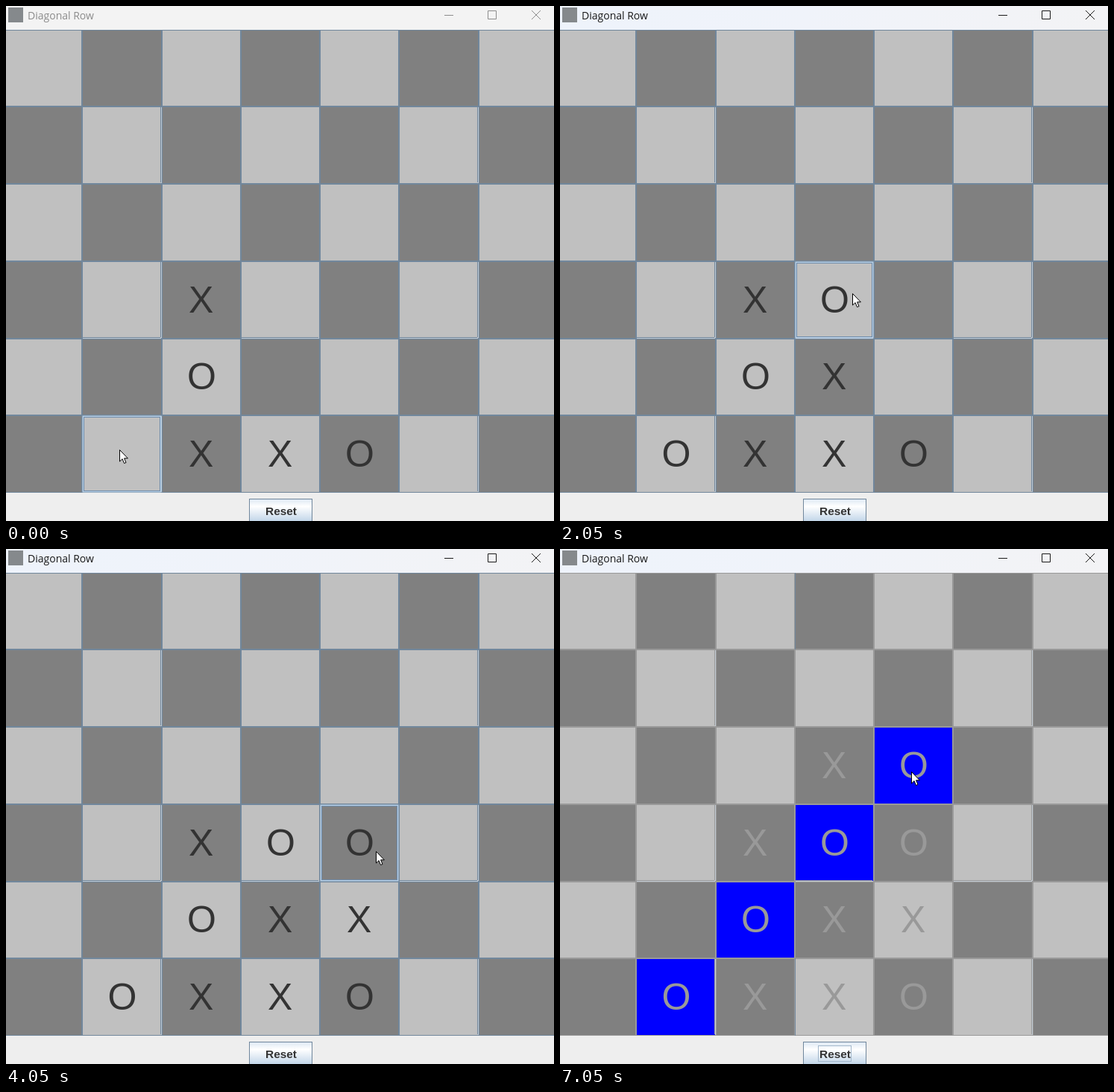
An HTML page for the animation above (8000 ms loop, 735 by 692 pixels).

```html
<!DOCTYPE html>
<html lang="en">
<head>
<meta charset="utf-8">
<title>Diagonal Row</title>
<style>
  html, body { margin: 0; width: 100%; height: 100%; overflow: hidden; background: #eee; }
  svg { display: block; width: 735px; height: 692px; --line: #71879c; --mark: #333; --ink: #1a1a1a; }
  svg.over { --line: #999; --mark: #999; }
  svg.idle { --ink: #8c8c8c; }
  .idle #active, svg:not(.over) .won { visibility: hidden; }
  .title { font: 14px "Open Sans", "Noto Sans", sans-serif; fill: var(--ink); }
  .controls { fill: none; stroke: var(--ink); }
  .grid { fill: none; stroke: var(--line); }
  .mark { font: 50px "Liberation Sans", Arial, sans-serif; fill: var(--mark); text-anchor: middle; }
  .reset { font: bold 15.4px "Liberation Sans", Arial, sans-serif; fill: #333; text-anchor: middle; }
</style>
</head>
<body>
<svg id="stage" class="idle" viewBox="0 0 735 692">
  <defs>
    <linearGradient id="bar">
      <stop stop-color="#eef3fb"/>
      <stop offset=".45" stop-color="#f0f3fa"/>
      <stop offset="1" stop-color="#f3f3f5"/>
    </linearGradient>
    <linearGradient id="gloss" x2="0" y2="1">
      <stop stop-color="#dde8f3"/>
      <stop offset=".3" stop-color="#fff"/>
      <stop offset="1" stop-color="#b8cfe5"/>
    </linearGradient>
  </defs>

  <rect width="735" height="32" fill="#f3f3f3"/>
  <rect id="active" width="735" height="32" fill="url(#bar)"/>
  <rect x="3" y="2" width="20" height="20" fill="#85898c"/>
  <text class="title" x="29" y="18">Diagonal Row</text>
  <path class="controls" d="M588 12.5h12M646.5 6.5h11v11h-11zM705 6l12 12m0-12l-12 12"/>

  <g id="board"></g>
  <g id="focus" fill="none">
    <rect id="glow" stroke="#b8cfe5" stroke-width="2"/>
    <rect id="inner" stroke="#6f8dad"/>
  </g>
  <g id="marks"></g>

  <rect x="326.5" y="662.5" width="84" height="33" fill="url(#gloss)" stroke="#71879c"/>
  <text class="reset" x="369" y="684">Reset</text>
  <rect class="won" x="346.5" y="667.5" width="44" height="21" fill="none" stroke="#a3b8cc"/>

  <path id="cursor" d="M.5 .5v15.5l3.6-3.4 2.4 5.9 2.5-1-2.4-5.7h4.8z" fill="#fff" stroke="#000"/>
</svg>
<script>
const LOOP = 8000;
const X = [-4, 102, 209, 315, 421, 527, 634, 740];
const Y = [32, 135, 239, 343, 447, 550, 654];

// focus: [row, column]; cursor: tip of the pointer
const steps = [
  { at: 0, focus: [5, 1], cursor: [152, 596] },
  { at: 1000, focus: [5, 1], cursor: [152, 596] },
  { at: 1050, focus: [4, 3], cursor: [343, 503] },
  { at: 2050, focus: [3, 3], cursor: [392, 386] },
  { at: 3050, focus: [4, 4], cursor: [488, 506] },
  { at: 4050, focus: [3, 4], cursor: [496, 406] },
  { at: 5050, focus: [2, 3], cursor: [376, 306] },
  { at: 6050, focus: [2, 4], cursor: [471, 299] },
  { at: 7050, focus: null, cursor: [471, 299] }
];

// letter, row, column, time of the move
const moves = [
  ["X", 5, 2, 0], ["X", 5, 3, 0], ["O", 5, 4, 0], ["O", 4, 2, 0], ["X", 3, 2, 0],
  ["O", 5, 1, 1000], ["X", 4, 3, 1050], ["O", 3, 3, 2050], ["X", 4, 4, 3050],
  ["O", 3, 4, 4050], ["X", 2, 3, 5050], ["O", 2, 4, 7050]
];

const $ = id => document.getElementById(id);
const stage = $("stage"), board = $("board");

function add(parent, tag, attrs, text = "") {
  const el = document.createElementNS("http://www.w3.org/2000/svg", tag);
  for (const key in attrs) el.setAttribute(key, attrs[key]);
  el.textContent = text;
  return parent.appendChild(el);
}

const cell = (row, col, inset = 0) => ({
  x: X[col] + inset,
  y: Y[row] + inset,
  width: X[col + 1] - X[col] - 2 * inset,
  height: Y[row + 1] - Y[row] - 2 * inset
});

function place(el, box) {
  for (const key in box) el.setAttribute(key, box[key]);
}

function buildBoard() {
  for (let row = 0; row < 6; row++)
    for (let col = 0; col < 7; col++) {
      add(board, "rect", { ...cell(row, col), fill: (row + col) % 2 ? "#808080" : "#c0c0c0" });
      if (row + col === 6 && row > 1)
        add(board, "rect", { ...cell(row, col), fill: "#00f", class: "won" });
    }

  const inner = X.slice(1, -1).map(x => `M${x} 32V654`).join("") +
    Y.slice(1, -1).map(y => `M0 ${y}H735`).join("");
  add(board, "path", { d: inner, class: "grid", "stroke-width": 2 });
  add(board, "path", { d: "M0 32.5H735M0 653.5H735", class: "grid" });
  add(board, "path", { d: "M315.5 32V135M315.5 550V654", stroke: "#71879c", class: "won" });

  // pale seams where raised edges show
  let seams = "";
  for (const col of [1, 5])
    for (const row of [1, 3, 5])
      seams += `M${X[col + 1] - .5} ${Y[row] + 1}V${Y[row + 1] - 1}`;
  for (const col of [1, 3, 5])
    seams += `M${X[col] + 1} ${Y[4] - .5}H${X[col + 1] - 1}`;
  add(board, "path", { d: seams, stroke: "#c3ccd5" });
  add(board, "path", { d: seams, class: "grid", transform: "translate(-1 -1)" });
}

buildBoard();

const marks = moves.map(([letter, row, col, at]) => ({
  at,
  el: add($("marks"), "text", {
    x: (X[col] + X[col + 1]) / 2 + (letter === "O" ? .4 : -.2),
    y: Y[row + 1] - 34.7,
    class: "mark"
  }, letter)
}));

let shown;
function show(step) {
  if (step === shown) return;
  shown = step;
  stage.classList.toggle("idle", step.at < 1000);
  stage.classList.toggle("over", step.at >= 7050);
  for (const m of marks) m.el.style.visibility = m.at <= step.at ? "visible" : "hidden";
  $("focus").style.visibility = step.focus ? "visible" : "hidden";
  if (step.focus) {
    place($("glow"), cell(...step.focus, 1.5));
    place($("inner"), cell(...step.focus, 2.5));
  }
  $("cursor").setAttribute("transform", `translate(${step.cursor})`);
}

const start = performance.now();
function tick() {
  const t = (performance.now() - start) % LOOP;
  show(steps.findLast(s => s.at <= t));
  requestAnimationFrame(tick);
}
tick();
</script>
</body>
</html>
```
